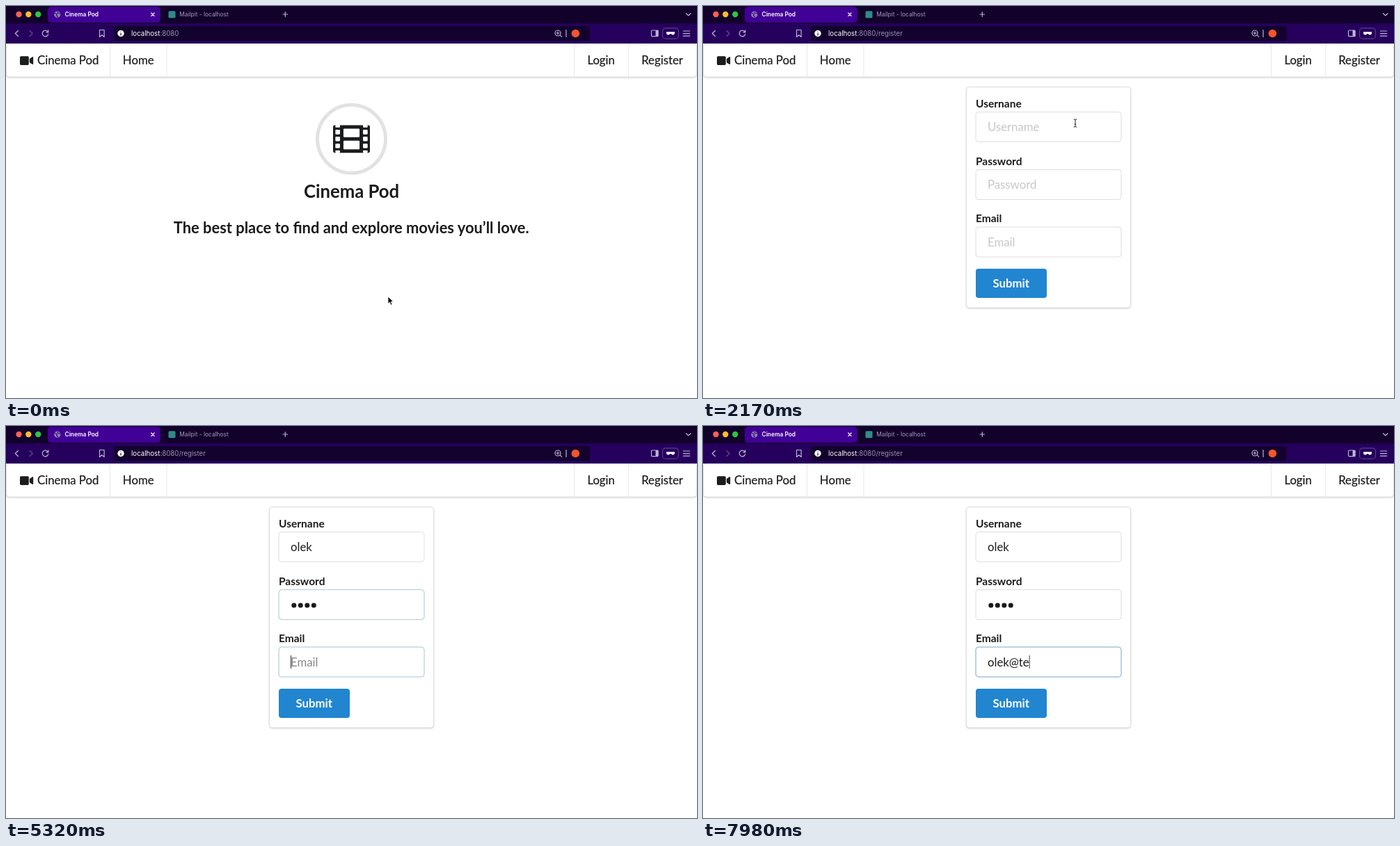
Animation, 993 px wide and 564 px high, one loop 8000 ms. Source, as an HTML page:

```html
<!DOCTYPE html>
<html lang="en">
<head>
<meta charset="utf-8">
<title>Sign-up demo</title>
<style>
  html, body { margin: 0; width: 100%; height: 100%; overflow: hidden; background: #fff; }
  svg { display: block; width: 993px; height: 564px; }
  text { font: 16.75px Lato, sans-serif; fill: #1b1b1c; }
  .nav { stroke: #1b1b1c; stroke-width: .2; }
  .mid { text-anchor: middle; }
  .ui { font: 8.4px Inter, sans-serif; fill: #a79bbd; }
  .ui.active { font-weight: 600; fill: #fff; }
  .ui.url { font-size: 9.7px; fill: #9c90b3; }
  .ui.url .host { fill: #fff; }
  .h1 { font-size: 25.7px; font-weight: 700; }
  .h2 { font-size: 21.88px; font-weight: 700; }
  .label { font-size: 15.5px; font-weight: 700; }
  .button { font-weight: 700; fill: #fff; }
  .line { fill: none; stroke: #bfb4d5; stroke-width: 1.2; stroke-linecap: round; stroke-linejoin: round; }
  .box { fill: #fff; stroke: #dededf; }
  .shadow { filter: drop-shadow(0 1px 1px #22242630); }
  .focus { fill: none; stroke: #85b7d9; }
</style>
</head>
<body>
<svg viewBox="0 0 993 564">
  <rect y="54" width="993" height="510" fill="#fff"/>
  <rect x=".5" y="53.5" width="992" height="48.5" rx="4" class="box shadow"/>
  <path d="M149.5 54v48M231 54v48M816.5 54v48M894.5 54v48" stroke="#e9e9e9"/>
  <path fill="#1b1c1d" transform="translate(20 70) scale(.0333)" d="M48 64h288q48 0 48 48v288q0 48-48 48H48q-48 0-48-48V112q0-48 48-48zM416 177l110-75q50-26 50 26v256q0 52-50 26l-110-75z"/>
  <text x="45" y="84.3" class="nav">Cinema Pod</text>
  <text x="190.2" y="84.3" class="nav mid">Home</text>
  <text x="855.2" y="84.3" class="nav mid">Login</text>
  <text x="943" y="84.3" class="nav mid">Register</text>

  <rect width="993" height="54" fill="#25005c"/>
  <rect width="993" height="25" fill="#12012b"/>
  <rect x="60" y="1" width="162" height="23" rx="5" fill="#410096"/>
  <rect x="155" y="29" width="684" height="21" rx="4" fill="#13012e"/>

  <circle cx="18.5" cy="12" r="4.2" fill="#ff5f57"/>
  <circle cx="32.3" cy="12" r="4.2" fill="#febc2e"/>
  <circle cx="46.2" cy="12" r="4.2" fill="#28c840"/>
  <g id="globe">
    <circle cx="73.8" cy="12.2" r="4.6" fill="#8b80ad"/>
    <path d="M70.5 10.5l3 1-1 2 2 2M74 8.5l1 2 3 .5" class="line" style="stroke:#3d0a80"/>
  </g>
  <path id="spinner" d="M75 8.2A4 4 0 0 1 78.2 14.6" class="line"/>
  <text id="title" class="ui active" x="84.5" y="15"></text>
  <path d="M208.7 10l4.4 4.4m0-4.4l-4.4 4.4" class="line" style="stroke:#fff"/>
  <rect x="233.5" y="7.2" width="10" height="10" rx="1.5" fill="#2f8c85"/>
  <text class="ui" x="249.2" y="15">Mailpit - localhost</text>
  <path d="M398 12h6.6m-3.3-3.3v6.6M977.5 10.7l3.2 3 3.2-3" class="line"/>

  <path d="M17.5 35.5l-4.2 4 4.2 4" class="line"/>
  <path d="M34 35.5l4.2 4-4.2 4" class="line" opacity=".4"/>
  <path id="reload" d="M60.2 37.3A4.3 4.3 0 1 0 60.7 40.3M60.8 34.8v3h-3" class="line"/>
  <path id="stop" d="M53.5 36.4l6 6m0-6l-6 6" class="line"/>
  <path d="M134.5 34.5h6.6v10l-3.3-2.8-3.3 2.8z" class="line"/>
  <circle cx="165" cy="39.5" r="4.7" fill="#fff"/>
  <path d="M165 39.3v2.6M165 37v.1" class="line" style="stroke:#13012e"/>
  <text class="ui url" x="180" y="42.8"><tspan class="host">localhost</tspan>:8080<tspan id="path"></tspan></text>
  <path d="M796.2 41.8l2.6 2.6M791 39h4M793 37v4M797 39a4 4 0 1 1-8 0a4 4 0 1 1 8 0" class="line"/>
  <path d="M805 34.5v10" class="line"/>
  <circle cx="818.4" cy="39.5" r="5.8" fill="#f4552d"/>
  <rect x="927.5" y="35" width="9.6" height="8.6" rx="1" class="line"/>
  <path d="M933.5 35h3.6v8.6h-3.6z" fill="#bfb4d5"/>
  <rect x="943.5" y="31.8" width="23" height="15.4" rx="4.5" class="line" style="stroke:#59408a"/>
  <path d="M949 37.3h12v2a2.6 2.6 0 0 1-5 .6h-2a2.6 2.6 0 0 1-5-.6z" fill="#fff"/>
  <path d="M973.3 36h9.4m-9.4 3.6h9.4m-9.4 3.6h9.4" class="line"/>

  <g id="home">
    <circle cx="496.5" cy="191.3" r="49" fill="none" stroke="#e2e2e2" stroke-width="5"/>
    <path id="film" fill="#1b1c1d" fill-rule="evenodd" transform="translate(496.5 191.3) scale(.1035) translate(-256 -256)"/>
    <text x="496.5" y="275.8" class="mid h1">Cinema Pod</text>
    <text x="496.2" y="327.3" class="mid h2">The best place to find and explore movies you’ll love.</text>
  </g>
  <g id="form">
    <rect x="378.5" y="116.5" width="236" height="317.5" rx="4" class="box shadow"/>
    <g id="fields"></g>
    <rect x="392" y="378" width="102" height="42" rx="4" fill="#2185d0"/>
    <text x="442.7" y="405.2" class="mid button">Submit</text>
    <path id="caret" d="M0 0v19" stroke="#333"/>
  </g>

  <g id="pointer" stroke-linejoin="round">
    <path id="arrow" d="M0 0v10.4l2.4-2.2 1.7 4 1.9-.8-1.7-3.9h3.3z" fill="#000" stroke="#fff" stroke-width=".8"/>
    <path id="hand" d="M-1.2 .8q1.1-1.2 2.1 0l.4 4.1q1-.8 1.8.3 1-.6 1.8.5 1.6-.3 1.7 1.2-.2 4-1.7 6h-5.2q-2-2.8-4-5 .6-1.8 3.2.5z" fill="#fff" stroke="#000" stroke-width=".9"/>
    <path id="beam" d="M-2.3-5.7q2 0 2.3 1.2.3-1.2 2.3-1.2M0-4.5v9M-2.3 5.7q2 0 2.3-1.2.3 1.2 2.3 1.2M-1.2 1.5h2.4" fill="none" stroke="#222"/>
  </g>
</svg>
<script>
const LOOP = 8000, BLINK = 530, FADE = 140;
const LOAD_START = 1300, LOAD_END = 1610, HIDE_POINTER = 2940;
const $ = id => document.getElementById(id);
const show = (el, on) => el.setAttribute('visibility', on ? 'inherit' : 'hidden');
const clamp01 = v => Math.min(1, Math.max(0, v));

// y is the top of the input; keys are the times of the key presses
const fields = [
  { label: 'Usernane', hint: 'Username', y: 152.5, focus: 2180, blur: 3570, value: 'olek', keys: [2940, 3150, 3360, 3430] },
  { label: 'Password', hint: 'Password', y: 235.5, focus: 3570, blur: 5250, keys: [3990, 4200, 4410, 4480] },
  { label: 'Email', hint: 'Email', y: 318, focus: 5250, blur: LOOP + FADE, value: 'olek@te', keys: [5670, 5880, 6090, 6300, 6930, 7490, 7630] }
];

const pointerPath = [
  [0, 549, 418], [100, 549, 418], [280, 940, 227], [350, 940, 227], [700, 957, 140],
  [1120, 925, 83.8], [1620, 925, 83.8], [1820, 680, 150], [1890, 680, 150], [2100, 535, 168.5], [LOOP, 535, 168.5]
];

// film strip on a 512 unit square: perforations down both sides, two windows
const roundRect = (x, y, w, h, r) => {
  const corner = (dx, dy) => `a${r} ${r} 0 0 1 ${dx} ${dy}`;
  return `M${x + r} ${y}h${w - 2 * r}${corner(r, r)}v${h - 2 * r}${corner(-r, r)}h${2 * r - w}${corner(-r, -r)}v${2 * r - h}${corner(r, -r)}z`;
};
let film = roundRect(0, 64, 512, 384, 24) + roundRect(144, 112, 224, 120, 12) + roundRect(144, 280, 224, 120, 12);
for (const x of [32, 416]) {
  film += roundRect(x, 64, 64, 32, 8) + roundRect(x, 416, 64, 32, 8);
  for (const y of [128, 224, 320]) film += roundRect(x, y, 64, 64, 12);
}
$('film').setAttribute('d', film);

for (const f of fields) {
  const g = document.createElementNS('http://www.w3.org/2000/svg', 'g');
  const frame = `x="392" y="${f.y}" width="209" height="43" rx="4"`;
  const dots = f.keys.map((_, i) => `<circle cx="${413.8 + 9.5 * i}" cy="${f.y + 22.5}" r="3.5" fill="#1a1a1a"/>`);
  g.innerHTML = `<text class="label" x="392" y="${f.y - 6.9}">${f.label}</text>
    <rect class="box" ${frame}/><rect class="focus" ${frame}/>
    <text class="value" x="409" y="${f.y + 27.5}"></text>${f.value ? '' : dots.join('')}`;
  $('fields').append(g);
  f.ring = g.querySelector('.focus');
  f.text = g.querySelector('.value');
  f.dots = [...g.querySelectorAll('circle')];
}

function drawField(f, t) {
  const count = f.keys.filter(k => k <= t).length;
  const active = t >= f.focus && t < f.blur;
  f.ring.setAttribute('opacity', clamp01((t - f.focus) / FADE) * clamp01(1 - (t - f.blur) / FADE));
  f.text.textContent = count ? (f.value || '').slice(0, count) : f.hint;
  f.text.style.fill = count ? '#1b1b1c' : active ? '#858585' : '#c7c7c7';
  f.dots.forEach((dot, i) => show(dot, i < count));
  if (!active) return;
  const last = count ? f.keys[count - 1] : f.focus;
  const width = !count ? 0 : f.value ? f.text.getComputedTextLength() : 9.5 * count;
  show($('caret'), (t - last) % (2 * BLINK) < BLINK);
  $('caret').setAttribute('transform', `translate(${409.5 + width} ${f.y + 12})`);
}

function drawPointer(t) {
  const i = pointerPath.findIndex(p => p[0] > t);
  const [t0, x0, y0] = pointerPath[i - 1], [t1, x1, y1] = pointerPath[i];
  const k = (t - t0) / (t1 - t0), e = k * k * (3 - 2 * k);
  const x = x0 + (x1 - x0) * e, y = y0 + (y1 - y0) * e;
  const link = x > 894 && y < 102;
  const input = t > LOAD_END && x > 392 && x < 601 && y > 152 && y < 196;
  $('pointer').setAttribute('transform', `translate(${x} ${y})`);
  show($('pointer'), t < HIDE_POINTER);
  show($('hand'), link);
  show($('beam'), input);
  show($('arrow'), !link && !input);
}

function draw() {
  const t = performance.now() % LOOP;
  const loading = t >= LOAD_START && t < LOAD_END;
  $('title').textContent = loading ? 'localhost:8080/register' : 'Cinema Pod';
  $('path').textContent = t < LOAD_START ? '' : '/register';
  $('spinner').setAttribute('transform', `rotate(${(t - 1540) * 0.36} 74.3 12.2)`);
  show($('spinner'), loading);
  show($('globe'), !loading);
  show($('stop'), loading);
  show($('reload'), !loading);
  show($('home'), t < LOAD_END);
  show($('form'), t >= LOAD_END);
  show($('caret'), false);
  for (const f of fields) drawField(f, t);
  drawPointer(t);
  requestAnimationFrame(draw);
}
draw();
</script>
</body>
</html>
```
